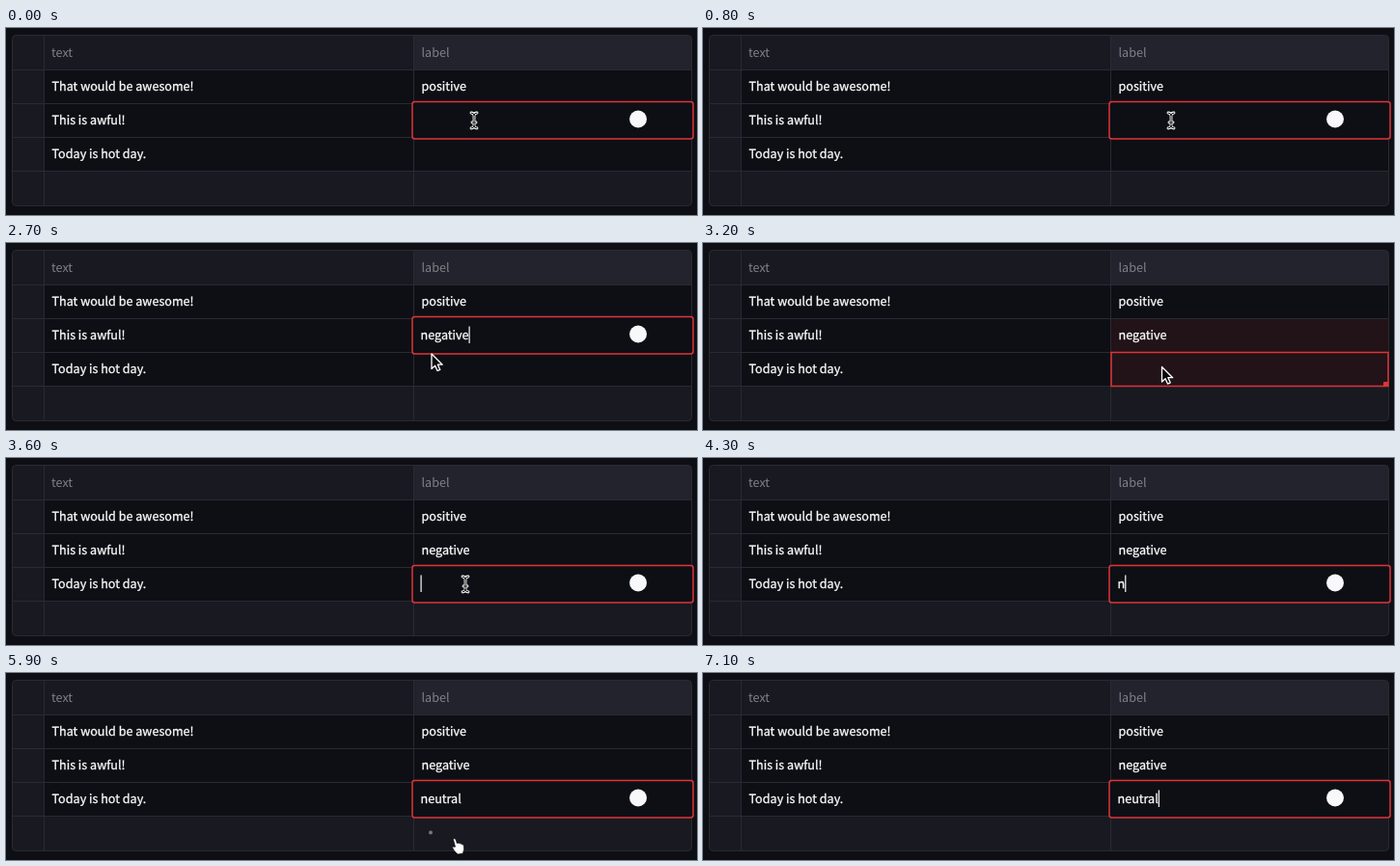
Animation of 716x194 px, one loop 7.2 s. Source, as an HTML page:

```html
<!DOCTYPE html>
<html lang="en">
<head>
<meta charset="utf-8">
<title>Editable table</title>
<style>
  html, body { margin: 0; width: 100%; height: 100%; overflow: hidden; background: #0e0f15; }
  svg { display: block; width: 716px; height: 194px; }
  text {
    font: 400 12.6px "Noto Sans CJK JP", "Noto Sans CJK SC", "Noto Sans CJK", "Open Sans", sans-serif;
    fill: #fafafa; stroke: #fafafa; stroke-width: .3px;
    text-rendering: geometricPrecision; white-space: pre;
  }
  .head { fill: #808087; stroke: none; }
  .line { fill: none; stroke: #292a32; }
  .red { stroke: #df3438; stroke-width: 1.5; }
</style>
</head>
<body>
<svg viewBox="0 0 716 194">
  <defs><clipPath id="round"><rect x="6.5" y="7.5" width="704" height="177" rx="4"/></clipPath></defs>
  <rect width="716" height="194" fill="#0e0f15"/>
  <g clip-path="url(#round)">
    <rect x="6" y="7" width="705" height="178" fill="#191a21"/>
    <rect x="423" y="7" width="288" height="36" fill="#22232c"/>
    <rect x="40" y="43" width="671" height="105" fill="#0e0f15"/>
    <rect id="tint" x="423" y="79" width="287" height="34" fill="#211318"/>
    <path class="line" d="M6 43.5H711M6 78.5H711M6 113.5H711M6 148.5H711M39.5 7V185M422.5 7V185"/>
  </g>
  <rect class="line" x="6.5" y="7.5" width="704" height="177" rx="4"/>
  <text class="head" x="47" y="30">text</text>
  <text class="head" x="430.5" y="30">label</text>
  <text x="47.5" y="65">That would be awesome!</text>
  <text x="47.5" y="100">This is awful!</text>
  <text x="47.5" y="135">Today is hot day.</text>
  <text x="430.5" y="65">positive</text>
  <text id="saved" x="430.5" y="100">negative</text>

  <g id="selection">
    <rect class="red" x="423" y="113.5" width="287" height="35" fill="#211318"/>
    <rect x="705" y="144" width="5" height="5" rx="1" fill="#df3438"/>
  </g>

  <g id="editor">
    <rect class="red" x="421" y="76.5" width="291" height="38.5" rx="2.5" fill="#0e0f15"/>
    <text id="entry" x="429.5" y="100"></text>
    <rect id="caret" y="86.5" width="1.2" height="17.5" fill="#fafafa"/>
    <circle cx="655" cy="94.5" r="9" fill="#f8f8fa"/>
  </g>

  <circle id="dot" cx="440" cy="165.5" r="2" fill="#77777d"/>
  <g id="beam" fill="none" stroke-linecap="round">
    <path id="beamShape" d="M-3-8Q0-8 0-5Q0-8 3-8M0-5V5M-3 8Q0 8 0 5Q0 8 3 8M-2 2H2" stroke="#fff" stroke-width="2.8"/>
    <use href="#beamShape" style="display:none"/>
    <path d="M-3-8Q0-8 0-5Q0-8 3-8M0-5V5M-3 8Q0 8 0 5Q0 8 3 8M-2 2H2" stroke="#111" stroke-width="1"/>
  </g>
  <path id="arrow" d="M0 0V15.5L3.6 12.2L6 17.6L8.8 16.4L6.4 11.2H11.2Z" fill="#0b0b0d" stroke="#fff" stroke-width="1.3" stroke-linejoin="round"/>
  <path id="hand" d="M0 .8C0-.6 2-.7 2.5 .8L4 5L4.6 4.4Q6 3.8 6.6 5Q8 4.4 8.7 5.8Q10.3 5.5 10.8 7L11.2 11L9.8 15.3L4.5 16L1 12.5L-1 9Q-.5 7.6 1.5 8.5L2 8.2Z" fill="#fff" stroke="#111" stroke-width=".7" stroke-linejoin="round"/>
</svg>
<script>
const LOOP = 7200, STEP = 100;
const $ = id => document.getElementById(id);

const typing = [
  { word: "negative", keys: [900, 1000, 1100, 1200, 1300, 1600, 1600, 1700] },
  { word: "neutral", keys: [4300, 4400, 4500, 4600, 4700, 4900, 5100] }
];
// Pointer paths: time, x, y
const arrowPath = [[2600, 433, 106], [2700, 441, 115], [2900, 467, 126], [3100, 475.5, 128.5], [3600, 475.5, 128.5]];
const handPath = [[5800, 457, 164], [5900, 463.5, 172], [6100, 463.5, 172]];

const within = (t, from, to) => t >= from && t < to;
const show = (id, on) => $(id).style.display = on ? "" : "none";
const place = (id, x, y) => $(id).setAttribute("transform", `translate(${x} ${y})`);

function follow(id, path, t) {
  const on = within(t, path[0][0], path[path.length - 1][0]);
  show(id, on);
  if (!on) return;
  const i = path.findIndex(p => p[0] > t);
  const [t0, x0, y0] = path[i - 1], [t1, x1, y1] = path[i];
  const k = (t - t0) / (t1 - t0);
  place(id, x0 + (x1 - x0) * k, y0 + (y1 - y0) * k);
}

function drawEditor(t) {
  const second = t >= 3600;
  show("editor", t < 2900 || second);
  place("editor", 0, second ? 35 : 0);
  const { word, keys } = typing[second ? 1 : 0];
  const count = keys.filter(k => k <= t).length;
  const entry = $("entry");
  entry.textContent = word.slice(0, count);
  const width = count ? entry.getComputedTextLength() : 0;
  $("caret").setAttribute("x", 429.5 + width);
  // The caret stays lit after each key, then blinks every half second.
  const start = count ? keys[count - 1] : second ? 3600 : 300;
  show("caret", t >= start && Math.floor((t - start) / 500) % 2 === 0);
}

function render(ms) {
  const t = Math.floor(ms % LOOP / STEP) * STEP;
  drawEditor(t);
  show("saved", t >= 2900);
  show("tint", within(t, 2900, 3300));
  show("selection", within(t, 3000, 3600));
  show("beam", t < 900 || within(t, 3600, 4100));
  if (t < 900) place("beam", 485, 96);
  else place("beam", 476, 131);
  follow("arrow", arrowPath, t);
  follow("hand", handPath, t);
  show("dot", within(t, 5800, 6100));
}

const begin = performance.now();
function tick() {
  render(performance.now() - begin);
  requestAnimationFrame(tick);
}
tick();
</script>
</body>
</html>
```
